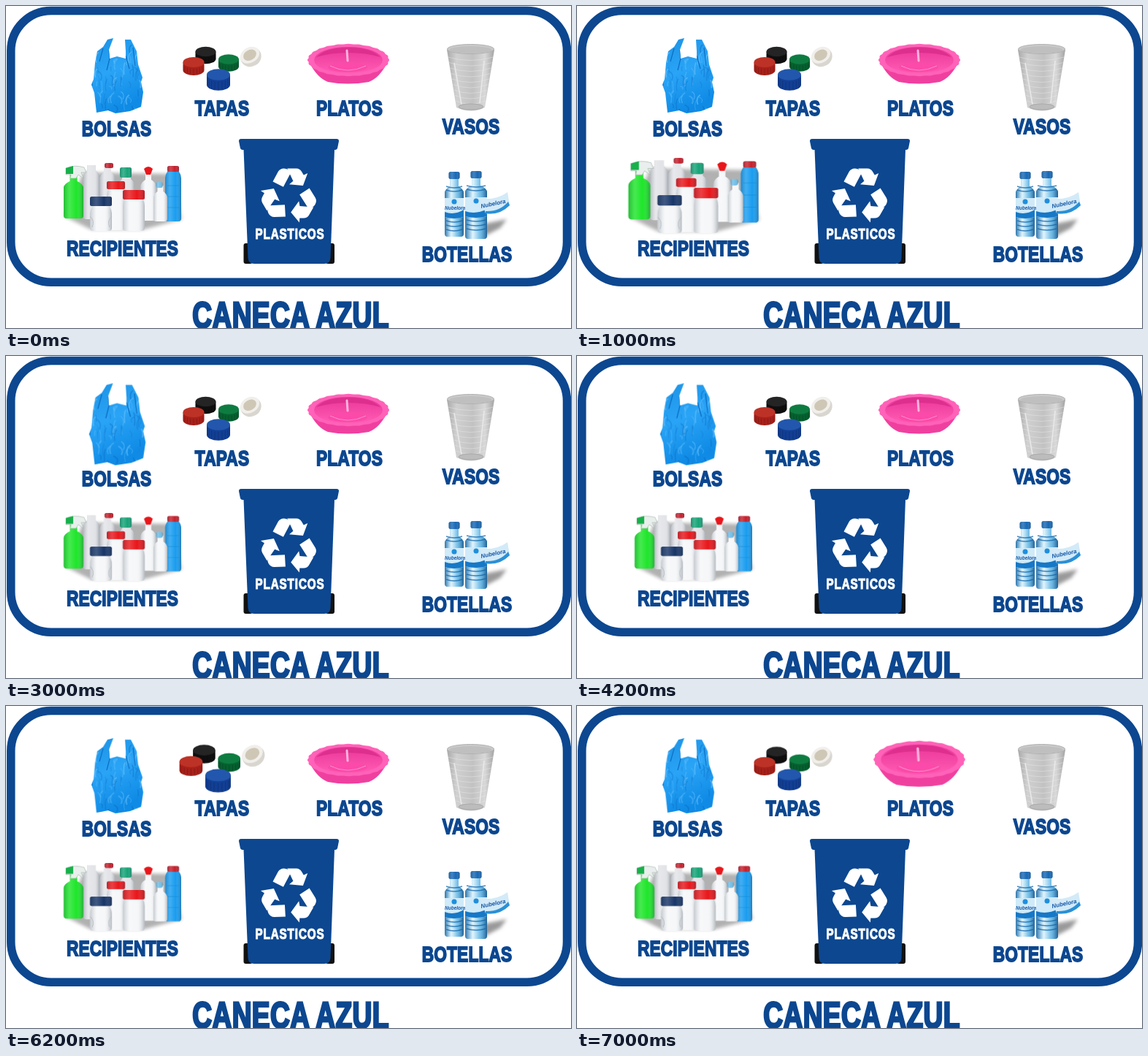
An HTML page for the animation above (8000 ms loop, 774x441 px).

```html
<!DOCTYPE html>
<html lang="es">
<head>
<meta charset="utf-8">
<title>Caneca azul</title>
<style>
html, body { margin: 0; width: 100%; height: 100%; overflow: hidden; background: #fff; }
svg { display: block; width: 774px; height: 441px; }
.labels text {
  font: bold 30.3px "Liberation Sans", Arial, sans-serif;
  text-anchor: middle; fill: #0c4790; stroke: #0c4790; stroke-width: 1.9;
  letter-spacing: .2px;
}
.labels .long { font-size: 31.6px; }
.labels .title { font-size: 49.5px; stroke-width: 3; letter-spacing: .5px; }
.labels .bin { font-size: 20.3px; fill: #fff; stroke: #fff; stroke-width: 1.1; letter-spacing: 1.2px; }
.brand { font: italic bold 8px "Liberation Sans", Arial, sans-serif; fill: #1558a8; }
.item { animation: 8s step-end infinite; }
#containers { transform-origin: 159.5px 280px; animation-name: containers; }
#bag { transform-origin: 152.5px 118px; animation-name: bag; }
#caps { transform-origin: 297px 86px; animation-name: caps; }
#plate { transform-origin: 469px 79px; animation-name: plate; }
@keyframes containers { 0%, 37.5%, 100% { transform: none } 12.5% { transform: scale(1.107) } }
@keyframes bag { 0%, 62.5%, 100% { transform: none } 37.5% { transform: scale(1.09) } }
@keyframes caps { 0%, 87.5%, 100% { transform: none } 62.5% { transform: scale(1.09) } }
@keyframes plate { 0% { transform: none } 87.5%, 100% { transform: scale(1.12, 1.15) } }
</style>
</head>
<body>
<svg viewBox="0 0 774 441">
  <defs>
    <linearGradient id="round">
      <stop offset="0" stop-color="#345" stop-opacity=".25"/>
      <stop offset=".3" stop-color="#fff" stop-opacity=".18"/>
      <stop offset=".65" stop-color="#fff" stop-opacity="0"/>
      <stop offset="1" stop-color="#234" stop-opacity=".32"/>
    </linearGradient>
    <linearGradient id="plastic" x2=".3" y2="1">
      <stop offset="0" stop-color="#1c93e6"/>
      <stop offset=".5" stop-color="#2aa4f6"/>
      <stop offset="1" stop-color="#0f8be6"/>
    </linearGradient>
    <linearGradient id="water">
      <stop offset="0" stop-color="#2a86c8"/>
      <stop offset=".35" stop-color="#d9f1fb"/>
      <stop offset=".7" stop-color="#6dbbe6"/>
      <stop offset="1" stop-color="#1b74b8"/>
    </linearGradient>
    <linearGradient id="bowl" x2="0" y2="1">
      <stop offset="0" stop-color="#ea3598"/>
      <stop offset="1" stop-color="#ff5cb4"/>
    </linearGradient>
    <linearGradient id="glass">
      <stop offset="0" stop-color="#a9a9a9"/>
      <stop offset=".2" stop-color="#d0d0d0"/>
      <stop offset=".55" stop-color="#c2c2c2"/>
      <stop offset=".8" stop-color="#d8d8d8"/>
      <stop offset="1" stop-color="#a4a4a4"/>
    </linearGradient>
    <filter id="soft" x="-30%" y="-30%" width="160%" height="160%"><feGaussianBlur stdDeviation="2.5"/></filter>
    <clipPath id="bagShape"><use href="#bagOutline"/></clipPath>
    <g id="arrow">
      <path d="M-25-21L-9-13 2-34Q-1-41-8-41-14-41-17-36Z"/>
      <path d="M-3-41H11Q16-41 19-36L22-31 28-34 21-15 0-17 6-22Z"/>
    </g>
  </defs>

  <rect x="6.75" y="6.5" width="761.75" height="371.75" rx="55" fill="#fff" stroke="#0c4790" stroke-width="11.5"/>

  <g id="bag" class="item">
    <path id="bagOutline" fill="url(#plastic)" d="M147 44L139 46 133 56 125 62 122 78 120 100 117 108 121 119 124 146 140 143 150 147 170 144 185 138 188 118 185 104 187 98 181 80 179 62 171 46 163 46 164 62 164 72 152 69 142 72 141 60Z"/>
    <g id="folds" clip-path="url(#bagShape)" fill="none"></g>
  </g>

  <g id="caps" class="item"></g>

  <g id="plate" class="item">
    <path fill="#f0409f" d="M416 78Q426 98 441 104 468 109 497 104 512 98 522 78Z"/>
    <path id="rim" fill="#ff62b8"/>
    <ellipse cx="469" cy="74" rx="47" ry="18" fill="url(#bowl)"/>
    <path d="M425 70Q438 57 469 57T513 70Q494 64 469 64T425 70Z" fill="#dd2f8e"/>
    <ellipse cx="468" cy="84" rx="27" ry="6.5" fill="#fb4aa9"/>
    <path d="M444 82Q468 94 493 82" fill="none" stroke="#ff8ccb" stroke-width="1"/>
    <path d="M467 61L468 75" stroke="#ffb3de" stroke-width="3" stroke-linecap="round"/>
  </g>

  <g id="cup">
    <path fill="url(#glass)" d="M604 60L617 139Q637 148 656 139L669 60Z"/>
    <g id="rings" fill="none" stroke="#ececec" stroke-width=".7" opacity=".6"></g>
    <ellipse cx="636.5" cy="59" rx="32" ry="6.5" fill="#cacaca" stroke="#b0b0b0"/>
    <ellipse cx="636.5" cy="60" rx="29" ry="5" fill="#bfbfbf"/>
    <path d="M614 78L624 135M655 75L649 133" stroke="#e8e8e8" stroke-width="1.6"/>
    <ellipse cx="637" cy="138" rx="17" ry="4" fill="#bcbcbc" stroke="#a2a2a2" stroke-width=".8"/>
  </g>

  <g id="containers" class="item"></g>

  <g id="bin">
    <rect x="325.5" y="325" width="12" height="28" rx="3" fill="#111"/>
    <rect x="438" y="325" width="12" height="28" rx="3" fill="#111"/>
    <path d="M325.5 196H450L444.5 345Q444 353 436 353H340Q332 353 331.500 345Z" fill="#0c4790"/>
    <path d="M322 182H453Q456 182 456 185L454 195Q453 197 451 197H324Q322 197 321 195L319 185Q319 182 322 182Z" fill="#0c4790"/>
    <g transform="translate(388 259.500) scale(.9)" fill="#fff">
      <use href="#arrow"/><use href="#arrow" transform="rotate(120)"/><use href="#arrow" transform="rotate(240)"/>
    </g>
  </g>

  <g id="bottles">
    <path d="M656 298L686 292 677 304 654 316Z" fill="#555" opacity=".6" filter="url(#soft)"/>
  </g>

  <g class="labels" id="labels"></g>
</svg>
<script>
const $ = id => document.getElementById(id);
const add = (id, markup) => $(id).insertAdjacentHTML('beforeend', markup);
const range = n => [...Array(n).keys()];

// All lettering shares one condensed style.
const label = (text, x, y, kind = '') =>
  add('labels', `<text class="${kind}" transform="translate(${x} ${y}) scale(.75 1)">${text}</text>`);
label('BOLSAS', 151.5, 177.5);
label('TAPAS', 296, 150);
label('PLATOS', 470.5, 149.5);
label('VASOS', 637, 174.5);
label('RECIPIENTES', 159.5, 342);
label('BOTELLAS', 631.5, 349.5);
label('PLASTICOS', 389, 318.5, 'bin');
label('CANECA AZUL', 390, 440.5, 'title');

let seed = 11;
const random = () => (seed = seed * 16807 % 2147483647) / 2147483647;
const tones = ['#7accff', '#0b6cc2', '#5bbcfb', '#1480d8'];
add('folds', range(64).map(i => {
  const x = 118 + random() * 68, y = 52 + random() * 90;
  const dx = (random() - .5) * 16, dy = 4 + random() * 13;
  return `<path d="M${x} ${y}q${dx} ${dy / 3} ${dx / 2} ${dy}" stroke="${tones[i % 4]}" stroke-width="${.6 + random() * 1.4}" opacity=".5"/>`;
}).join('') + '<path d="M141 60L142 72 138 88M164 68L169 86M133 58L128 76M174 57L177 82" stroke="#0b6cc2" stroke-width="1.2"/>');

function cap(x, y, rx, height, side, top) {
  const ry = rx * .48, base = y + height;
  const ribs = range(9).map(i => {
    const a = Math.PI * (i + 1) / 10, px = x + rx * Math.cos(a), py = y + ry * Math.sin(a);
    return `M${px} ${py + 2}v${height - 3}`;
  }).join('');
  add('caps', `<path d="M${x - rx} ${y}V${base}A${rx} ${ry} 0 0 0 ${x + rx} ${base}V${y}Z" fill="${side}"/>
    <path d="${ribs}" stroke="#000" stroke-width=".8" opacity=".22"/>
    <ellipse cx="${x}" cy="${y}" rx="${rx}" ry="${ry}" fill="${top}"/>`);
}
cap(273.5, 62.5, 14, 10, '#0f0f0f', '#242424');
cap(257, 77, 14.5, 11, '#a8201a', '#bd3226');
cap(305, 73, 14, 10, '#066030', '#0e7c40');
cap(291, 94, 16, 14, '#123f95', '#2257ad');
add('caps', `<g transform="rotate(-30 335 69)">
  <ellipse cx="335" cy="70" rx="14.5" ry="13" fill="#d9d6cf"/>
  <ellipse cx="335" cy="67" rx="14" ry="10.5" fill="#f1efeb"/>
  <ellipse cx="335" cy="67" rx="9.5" ry="7" fill="#cfc7b6"/></g>`);

$('rim').setAttribute('d', 'M' + range(145).map(i => {
  const a = i * Math.PI / 72, wave = 1 + .011 * Math.cos(24 * a);
  return `${469 + 55.5 * wave * Math.cos(a)} ${74 + 22 * wave * Math.sin(a)}`;
}).join('L') + 'Z');

add('rings', range(9).map(i => {
  const y = 70 + i * 7.5, half = 31 - i * 1.4;
  return `<path d="M${636.5 - half} ${y}q${half} 9 ${half * 2} 0"/>`;
}).join(''));

// Symmetric vessel: narrow neck, curved shoulder, rounded base.
function vessel(group, x, half, neck, top, shoulder, bottom, fill) {
  const d = `M${x - neck} ${top}V${shoulder - 9}Q${x - half} ${shoulder - 5} ${x - half} ${shoulder}
    V${bottom - 4}Q${x - half} ${bottom} ${x - half + 4} ${bottom}H${x + half - 4}
    Q${x + half} ${bottom} ${x + half} ${bottom - 4}V${shoulder}
    Q${x + half} ${shoulder - 5} ${x + neck} ${shoulder - 9}V${top}Z`;
  add(group, `<path d="${d}" fill="${fill}"/><path d="${d}" fill="url(#round)"/>`);
}
function lid(group, x, half, top, height, fill) {
  const box = `x="${x - half}" y="${top}" width="${half * 2}" height="${height}" rx="2.5"`;
  add(group, `<rect ${box} fill="${fill}"/><rect ${box} fill="url(#round)"/>`);
}
const white = '#f6f7f9', grey = '#e3e4e8', red = '#e8161a', darkRed = '#c4202c', store = 'containers';
add(store, '<path d="M80 288L106 228 226 230 241 292 188 306 116 306Z" fill="#444" opacity=".42" filter="url(#soft)"/>');
vessel(store, 117, 11, 6, 218, 234, 292, grey);
vessel(store, 139, 10.5, 5, 222, 237, 287, grey);
lid(store, 141, 6, 215, 7, darkRed);
vessel(store, 165, 11, 6, 234, 246, 290, grey);
lid(store, 164, 8, 221, 14, '#16a477');
vessel(store, 195, 10.5, 4, 229, 247, 294, white);
add(store, `<path d="M189 223Q195 217 201 223L198 231H192Z" fill="${red}"/>`);
vessel(store, 229, 11, 8, 226, 236, 295, '#1a9df0');
lid(store, 229, 8, 219, 8, darkRed);
add(store, '<path d="M221 246h16M221 261h16M221 276h16" stroke="#0b82c6" opacity=".4"/>');
vessel(store, 211.5, 9.5, 4, 246, 263, 295, white);
lid(store, 210, 4.5, 241, 8, '#72bfe8');
vessel(store, 92.5, 13.5, 5, 230, 249, 291, '#1ee62a');
add(store, `<path d="M82 222Q94 217 107 221L110 228 103 228 106 236 99 231 96 236H88L89 231H82Z" fill="#e9efec" stroke="#9fb0a6" stroke-width=".6"/>
  <path d="M82 222L92 219V230H82Z" fill="#17b04a"/>`);
vessel(store, 151, 13, 11, 248, 260, 307, white);
lid(store, 150.5, 12.5, 240, 11, red);
vessel(store, 130, 15, 12, 273, 284, 308, white);
add(store, '<path d="M115 288Q122 294 118 303M145 288Q138 294 142 303" fill="none" stroke="#b7c0c5"/>');
lid(store, 130, 15, 261, 13, '#173568');
vessel(store, 175, 15, 13, 263, 274, 308, white);
lid(store, 175, 15, 252, 13, red);

function waterBottle(x, top, half, bottom) {
  vessel('bottles', x, half, 6, top + 8, top + 29, bottom, 'url(#water)');
  lid('bottles', x, 7.5, top, 10, '#1768b5');
  const stripe = y => `M${x - half + 2} ${y}q${half - 2} 4 ${half * 2 - 4} 0`;
  add('bottles', `<path d="${[20, 25, 67, 73, 79].map(y => stripe(top + y)).join('')}" fill="none" stroke="#0f63a8" stroke-width="1.4" opacity=".75"/>
    <path d="M${x - half} ${top + 36}h${half * 2}v26q${-half} 4 ${-half * 2} 0Z" fill="#cfeaf8"/>
    <path d="M${x - half} ${top + 55}q${half} 5 ${half * 2} -3v10q${-half} 4 ${-half * 2} 0Z" fill="#1778c6"/>
    <circle cx="${x}" cy="${top + 41}" r="3.5" fill="#1f8fdc"/>`);
}
waterBottle(614, 227, 13, 316);
waterBottle(644, 226, 15, 319);
add('bottles', `
  <path d="M650 264Q672 266 687 255L690 273Q676 287 657 284Z" fill="#d3eaf7"/>
  <path d="M657 281Q676 282 688 268L690 273Q676 287 657 284Z" fill="#2a90d6"/>
  <text class="brand" x="601" y="279" style="font-size:6.5px">Nubelora</text>
  <text class="brand" x="651" y="277" transform="rotate(-12 651 277)">Nubelora</text>`);
</script>
</body>
</html>
```
